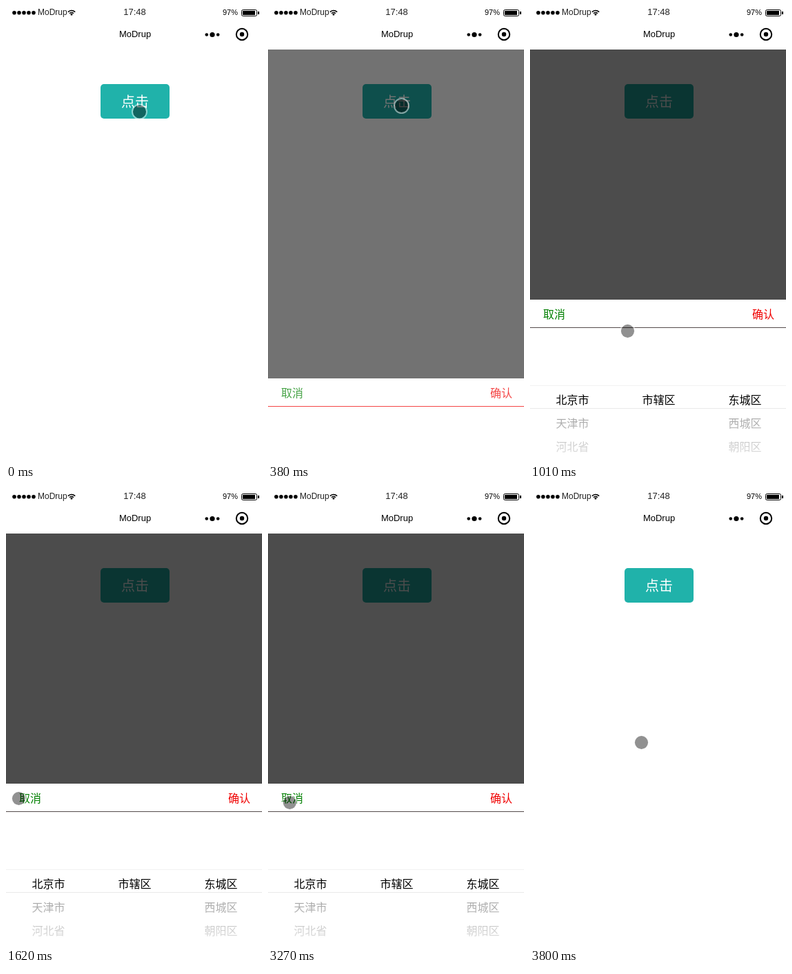
Write an HTML page with a canvas that moves like this. It is 371 px wide and 660 px high and loops after 3.88 s.

```html
<!DOCTYPE html>
<html lang="zh">
<head>
<meta charset="utf-8">
<title>Region picker</title>
<style>
  html, body { margin: 0; width: 100%; height: 100%; overflow: hidden; background: #fff; }
  canvas { display: block; width: 371px; height: 660px; }
</style>
</head>
<body>
<canvas id="stage"></canvas>
<script>
const W = 371, H = 660, LOOP = 3880, REST = 425;
const LATIN = '"Liberation Sans", Arial, sans-serif';
const CJK = '"Noto Sans CJK SC", "Noto Sans CJK", sans-serif';
const APP = 'MoDrup';

// The screen refreshes only at these moments (ms).
const TICKS = [
  0, 60, 150, 290, 380, 460, 530, 610, 690, 770, 840, 930, 1010,
  1160, 1240, 1310, 1390, 1470, 1540, 1620,
  1760, 1840, 1920, 2000, 2090, 2170, 2250, 2320, 2410, 2490,
  2640, 2730, 2810, 2880, 2960, 3040, 3190, 3270,
  3500, 3570, 3650, 3720, 3800
];

// Pointer path: time, x, y
const PATH = [
  [0, 193.5, 153], [60, 193.5, 149], [150, 193.5, 144.5], [380, 193.5, 144.5],
  [460, 192, 152], [530, 185, 188], [610, 174.5, 236.5], [770, 156.5, 378.5],
  [840, 150, 420], [930, 144, 456], [1010, 141.5, 470.5],
  [1160, 132, 466], [1390, 68, 449], [1540, 24, 442.5], [1620, 18.5, 446.5],
  [1760, 24, 448], [2000, 165, 466], [2250, 313.5, 459], [2490, 332.5, 457],
  [2640, 313.5, 458.5], [2810, 190, 469], [2960, 60, 461], [3040, 31.5, 453.5],
  [3190, 30, 456], [3270, 31.5, 452.5], [3500, 33, 452.5], [3570, 42.5, 452.5],
  [3650, 78, 429], [3720, 122, 394], [3800, 161.5, 365.5]
];

const COLUMNS = [
  [61.5, ['北京市', '天津市', '河北省']],
  [186.5, ['市辖区']],
  [311.5, ['东城区', '西城区', '朝阳区']]
];

const canvas = document.getElementById('stage');
const g = canvas.getContext('2d');
const scale = window.devicePixelRatio || 1;
canvas.width = Math.round(W * scale);
canvas.height = Math.round(H * scale);

const clamp = v => Math.min(1, Math.max(0, v));
const bezier = (a, b, s) => 3 * a * s * (1 - s) ** 2 + 3 * b * s * s * (1 - s) + s ** 3;

// cubic-bezier(.25, .1, .25, 1)
function ease(v) {
  const x = clamp(v);
  if (x === 0 || x === 1) return x;
  let lo = 0, hi = 1;
  for (let i = 0; i < 24; i++) {
    const mid = (lo + hi) / 2;
    if (bezier(0.25, 0.25, mid) < x) lo = mid; else hi = mid;
  }
  return bezier(0.1, 1, lo);
}

function pointerAt(t) {
  const i = PATH.findIndex(p => p[0] > t);
  if (i < 0) return PATH[PATH.length - 1].slice(1);
  const [t0, x0, y0] = PATH[i - 1], [t1, x1, y1] = PATH[i];
  const k = (t - t0) / (t1 - t0);
  return [x0 + (x1 - x0) * k, y0 + (y1 - y0) * k];
}

function rect(x, y, w, h, fill) {
  g.fillStyle = fill;
  g.fillRect(x, y, w, h);
}

function box(x, y, w, h, r) {
  g.beginPath();
  g.moveTo(x + r, y);
  g.arcTo(x + w, y, x + w, y + h, r);
  g.arcTo(x + w, y + h, x, y + h, r);
  g.arcTo(x, y + h, x, y, r);
  g.arcTo(x, y, x + w, y, r);
  g.closePath();
}

function disc(x, y, r, fill) {
  g.fillStyle = fill;
  g.beginPath();
  g.arc(x, y, r, 0, Math.PI * 2);
  g.fill();
}

function ring(x, y, r, width, stroke) {
  g.strokeStyle = stroke;
  g.lineWidth = width;
  g.beginPath();
  g.arc(x, y, r, 0, Math.PI * 2);
  g.stroke();
}

function label(text, x, y, size, fill, family, align = 'center') {
  g.font = size + 'px ' + family;
  g.textAlign = align;
  g.textBaseline = 'alphabetic';
  g.fillStyle = fill;
  g.fillText(text, x, y);
}

function wifi(x, y) {
  disc(x, y - 1.2, 1.4, '#000');
  g.strokeStyle = '#000';
  g.lineWidth = 1.7;
  for (const r of [4, 7]) {
    g.beginPath();
    g.arc(x, y, r, -Math.PI * 0.76, -Math.PI * 0.24);
    g.stroke();
  }
}

function drawBars() {
  rect(0, 0, W, 63, '#fff');
  for (let i = 0; i < 5; i++) disc(12 + i * 7, 9.7, 2.8, '#000');
  label(APP, 46, 13, 12, '#222', LATIN, 'left');
  wifi(95, 13.5);
  label('17:48', 186.5, 13, 13, '#222', LATIN);
  label('97%', 314, 13, 11, '#000', LATIN, 'left');

  box(341.5, 5.5, 22, 9, 2);
  g.strokeStyle = '#000';
  g.lineWidth = 1;
  g.stroke();
  rect(343, 7, 18, 6, '#000');
  rect(365, 8, 2, 4, '#000');

  label(APP, 187, 45, 13, '#000', LATIN);
  disc(290.8, 41.5, 2.3, '#000');
  disc(299, 41.5, 3.6, '#000');
  disc(307.2, 41.5, 2.3, '#000');
  ring(342, 41, 8.2, 2, '#000');
  disc(342, 41, 3.2, '#000');
}

function drawPage() {
  rect(0, 0, W, H, '#fff');
  box(137, 113, 100, 50, 5);
  g.fillStyle = '#20b2aa';
  g.fill();
  label('点击', 187, 145.5, 20, '#fff', CJK);
}

function drawSheet(top, alpha, line, filled) {
  rect(0, top, W, H - top, '#fff');
  g.globalAlpha = alpha;
  label('取消', 19, top + 26.5, 16, '#008000', CJK, 'left');
  label('确认', 354, top + 26.5, 16, '#f00000', CJK, 'right');
  rect(0, top + 40, W, 1, line);
  if (filled) {
    rect(0, top + 124, W, 1, '#f2f2f2');
    rect(0, top + 157, W, 1, '#e9e9e9');
    const fade = g.createLinearGradient(0, top + 158, 0, top + 245);
    fade.addColorStop(0, 'rgba(0,0,0,.4)');
    fade.addColorStop(1, 'rgba(0,0,0,.05)');
    for (const [x, names] of COLUMNS) {
      names.forEach((name, i) =>
        label(name, x, top + 150.5 + i * 34, 16, i ? fade : '#000', CJK));
    }
  }
  g.globalAlpha = 1;
}

function drawOverlay(t) {
  if (t < 290 || t >= 3800) return;
  const closing = t >= 3500;
  const start = closing ? 3490 : 233;
  const [slide, dim, tone] = (closing ? [480, 240, 500] : [490, 300, 340])
    .map(d => {
      const k = ease((t - start) / d);
      return closing ? 1 - k : k;
    });
  const line = closing ? '#b02c3c' : t < 770 ? '#f00000' : '#554c4c';
  rect(0, 63, W, H - 63, `rgba(0,0,0,${0.7 * dim})`);
  drawSheet(Math.round(H - (H - REST) * slide), tone, line, t >= 460);
}

function drawPointer(t) {
  const [x, y] = pointerAt(t);
  disc(x, y, 9.7, 'rgba(0,0,0,.43)');
  ring(x, y, 10.5, 2, 'rgba(255,255,255,.48)');
}

function render(now) {
  const clock = now % LOOP;
  let t = 0;
  for (const tick of TICKS) if (tick <= clock) t = tick;
  g.setTransform(scale, 0, 0, scale, 0, 0);
  drawPage();
  drawOverlay(t);
  drawBars();
  drawPointer(t);
}

const began = performance.now();
function loop() {
  render(performance.now() - began);
  requestAnimationFrame(loop);
}
loop();
</script>
</body>
</html>
```
